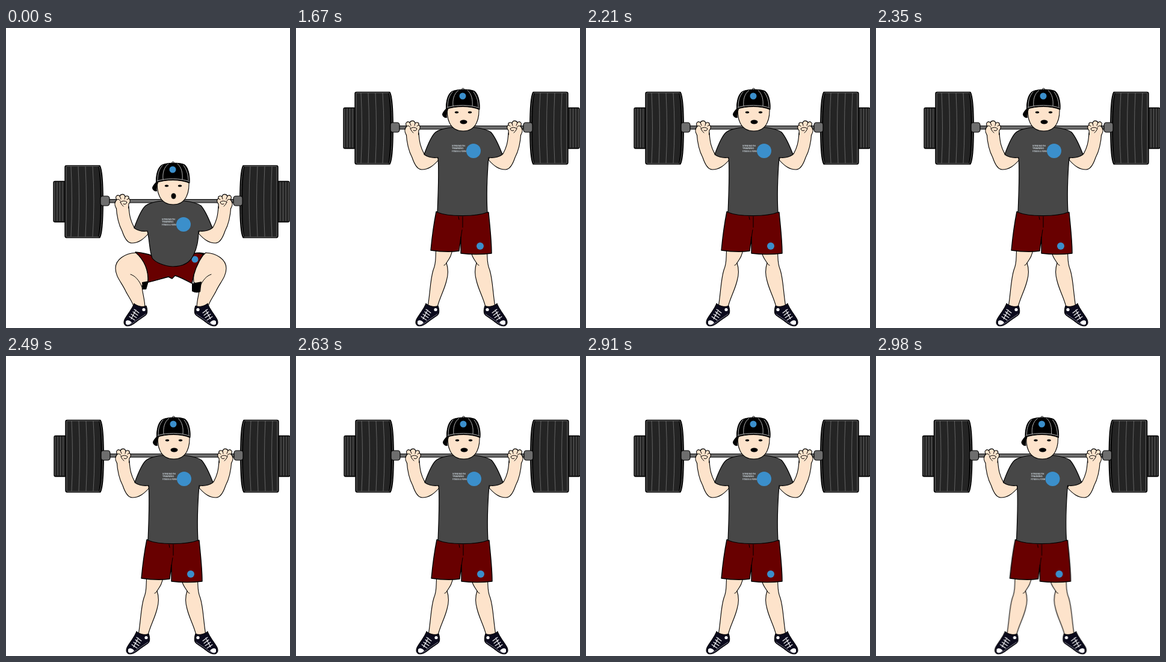
An HTML page that plays this animation: 472x498 px, repeating every 3050 ms.

```html
<!DOCTYPE html>
<html lang="en">
<head>
<meta charset="utf-8">
<title>Barbell squat</title>
<style>
  html, body { margin: 0; width: 100%; height: 100%; overflow: hidden; background: #fff; }
  svg { display: block; width: 472px; height: 498px; }
  path, rect, ellipse { stroke-linejoin: round; stroke-linecap: round; }
  .skin { fill: #fde3cb; stroke: #000; stroke-width: 1.1; }
  .shirt { fill: #474747; stroke: #000; stroke-width: 1.2; }
  .shorts { fill: #680000; stroke: #000; stroke-width: 1.4; }
  .steel { fill: #6e6e6e; stroke: #000; stroke-width: 1.2; }
  .iron { fill: #242424; stroke: #000; stroke-width: 1.4; }
  .line { fill: none; stroke: #000; stroke-width: 1; }
  .rib { fill: none; stroke: #6a6a6a; stroke-width: .9; }
  .seam { fill: none; stroke: #e4e4e4; stroke-width: .8; }
  .lace { fill: none; stroke: #fff; stroke-width: 1.1; }
  .badge { fill: #3b8fcb; }
  text { font: bold 4px "Liberation Sans", Arial, sans-serif; fill: #c9d3da; }

  .man, .upper, .squat, .stand { animation: 3050ms step-end infinite; }
  .man { animation-name: shake; }
  .upper { animation-name: lift; }
  .squat { animation-name: leave; }
  .stand { animation-name: enter; }

  @keyframes lift {
    0% { transform: translateY(122px); }
    54.754%, 100% { transform: none; }
  }
  @keyframes leave {
    0% { visibility: visible; }
    54.754%, 100% { visibility: hidden; }
  }
  @keyframes enter {
    0% { visibility: hidden; }
    54.754%, 100% { visibility: visible; }
  }
  /* tremble: one swing each 70 ms from 2070 ms on */
  @keyframes shake {
    0% { transform: none; }
    67.868%, 72.459%, 77.049%, 81.639%, 86.229%, 90.819%, 95.409% { transform: translateX(1px); }
    70.163%, 74.754%, 79.344%, 83.934%, 88.524%, 93.114%, 97.704%, 100% { transform: translateX(-1.5px); }
  }
</style>
</head>
<body>
<svg viewBox="0 0 472 498">
  <defs>
    <g id="weights">
      <rect class="iron" x="79" y="132.500" width="20" height="67.500" rx="2.500"/>
      <path class="rib" d="M80.500 134V198M85 134V198M89.500 134V198M94 134V198"/>
      <path class="iron" d="M100.500 106.500H156C163 118 163 214 156 226H100.500Q98 226 98 223V109Q98 106.500 100.500 106.500Z"/>
      <path d="M153 107.500H156C162 119 162 213 156 225H153C158 209 158 123 153 107.500Z"/>
      <path class="rib" d="M100 108V224M108 108Q111 166 108 224M120 108Q123 166 120 224M132 108Q135 166 132 224M144 108Q148 166 144 224M101 107.500H154M101 225H154M155 108C161 122 161 211 155 224"/>
      <rect class="steel" x="157" y="157" width="15" height="16" rx="4"/>
    </g>

    <g id="arm">
      <path class="skin" d="M183 173C184 190 187 204 193 215C197 227 202 235 209 235C220 235 228 229 237 219L230 200L213 209C207 198 205 190 204 174Z"/>
      <path class="skin" stroke="none" d="M183 177C179 170 181 166 184 163C180 157 186 154 189 157C191 153 197 153 198 158C202 155 205 158 204 161C208 163 206 168 204 170L203.500 177" style="stroke-dasharray:none"/>
      <path class="line" d="M184 163Q188 161 190 165M189 157L191 162M198 158L197 162M204 161L201 163M190 167Q196 163 201 167Q200 172 195 170M190 167Q192 172 195 174"/>
    </g>

    <g id="calf">
      <path class="skin" d="M233 366C231 380 234 388 228 402C223 418 223 440 219 463H235C239 447 246 436 250 420C253 410 253 399 250 390C254 384 259 378 260 366Z"/>
      <path class="line" d="M246 394Q249 393 250 390"/>
    </g>

    <g id="thigh">
      <path class="skin" d="M216 373C198 374 182 384 182 399C182 413 192 422 199 437C204 447 211 455 213 465H231C231 451 226 438 226 428L236 422C238 403 230 385 216 373Z"/>
      <path class="line" d="M226 430C221 418 214 411 207 409"/>
    </g>

    <g id="shoe">
      <path d="M216 457.500C212 467 205 475 201 482C198 487 198 493 203 494.500C209 496 216 491 222 486L235 477C239 474 238 466 236 461C230 464 222 462 216 457.500Z" fill="#0b0a1c" stroke="#000"/>
      <path d="M202 487C204 484 209 485 212 489C209 493 204 494 202 491Z" fill="#fff"/>
      <path class="lace" d="M208 479L217 485M211 475L220 481M214 471L222 477M216 467L224 473M219 468L211 483"/>
      <circle cx="232" cy="467.500" r="2.600" fill="#fff"/>
      <path d="M204 493Q211 493 220 485L235 475" fill="none" stroke="#a9a9b2" stroke-width=".7"/>
    </g>
  </defs>

  <g class="man">
    <g class="squat">
      <path d="M226 420H237L233 434H227Z"/>
      <path d="M307 376C316 371 326 372 334 375L326 381Z"/>
      <use href="#thigh"/>
      <use href="#thigh" transform="matrix(-1 0 0 1 548 0)"/>
      <path d="M226 422L237 420L233 433L227 434Z"/>
      <path d="M309 424L325 421L323 438Q316 441 309 437Z"/>
      <path class="shorts" d="M215 372C225 373 236 375 243 378L312 374C318 373 324 374 328 376C318 390 312 405 309 424C298 418 288 413 281 411L276 416L270 413C258 416 248 420 236 422C237 403 230 385 215 372Z"/>
      <circle class="badge" cx="314" cy="384" r="5.500"/>
      <use href="#shoe" x="-3"/>
      <use href="#shoe" transform="matrix(-1 0 0 1 551 0)"/>
    </g>

    <g class="stand">
      <use href="#calf"/>
      <use href="#calf" transform="matrix(-1 0 0 1 550 0)"/>
      <path class="shorts" d="M233 305C229 325 226 348 224 369C238 371 257 372 271 370L274 347L274 374C290 376 309 376 325 374C325 352 322 328 320 306Z"/>
      <path class="line" d="M277 313V331M276 335L274 348M270 313L271 318"/>
      <circle class="badge" cx="306" cy="362" r="6"/>
      <use href="#shoe"/>
      <use href="#shoe" transform="matrix(-1 0 0 1 550 0)"/>
    </g>

    <g class="upper">
      <rect class="steel" x="170" y="162.500" width="210" height="5.500"/>
      <use href="#weights"/>
      <use href="#weights" transform="matrix(-1 0 0 1 550 0)"/>
      <use href="#arm"/>
      <use href="#arm" transform="matrix(-1 0 0 1 557 0)"/>

      <path class="shirt squat" d="M243 168C250 166 256 165 262 165H296C306 166 318 169 324 173C332 182 338 197 343 210C336 215 328 216 320 215C320 232 316 246 312 254C306 268 293 274 277 274C262 273 248 267 243 260C238 246 239 232 235 215C228 216 220 215 213 210C218 196 225 179 232 173C236 170 240 169 243 168Z"/>
      <path class="shirt stand" d="M243 168C250 166 256 165 262 165H296C306 166 318 169 324 173C332 182 338 197 343 210C336 215 328 216 320 215C318 240 316 270 318 306C300 313 255 314 235 306C236 280 238 240 236 215C228 216 220 215 213 210C218 196 225 179 232 173C236 170 240 169 243 168Z"/>
      <text x="259" y="197">STRENGTH</text>
      <text x="259" y="201.300">TRAINING</text>
      <text x="259" y="206" style="font-size:2.800px">FITNESS &amp; FORM</text>
      <circle class="badge" cx="295" cy="204" r="12"/>

      <path class="skin" d="M252 128C249 150 255 171 278 171C300 171 306 150 303.500 128Z"/>
      <path d="M250 133C246 137 243 141 243 144C244 148 248 150 251 149C250 144 251 140 253 135Z"/>
      <circle cx="277.500" cy="102" r="2" fill="#ddd" stroke="#000" stroke-width=".8"/>
      <path d="M249.500 135C249 122 252 111 258 106C266 101 290 101 297 105C303 110 306 123 305 135.500C290 129 265 129 249.500 135Z" stroke="#000"/>
      <path class="seam" d="M270 103.500C262 109 260 120 261 129M260 106C253 114 252 123 252 131M285 103.500C292 109 294 120 293 129M295 106C301 114 303 123 303 131M251 132C266 127 289 127 304 132.500"/>
      <circle class="badge" cx="277" cy="113" r="5.500"/>

      <ellipse cx="267" cy="140" rx="3.200" ry="1.700"/>
      <ellipse cx="289" cy="140" rx="3.200" ry="1.700"/>
      <ellipse class="squat" cx="278.500" cy="157" rx="4" ry="4.800"/>
      <ellipse class="stand" cx="278.500" cy="156" rx="6" ry="3.400"/>
    </g>
  </g>
</svg>
</body>
</html>
```
